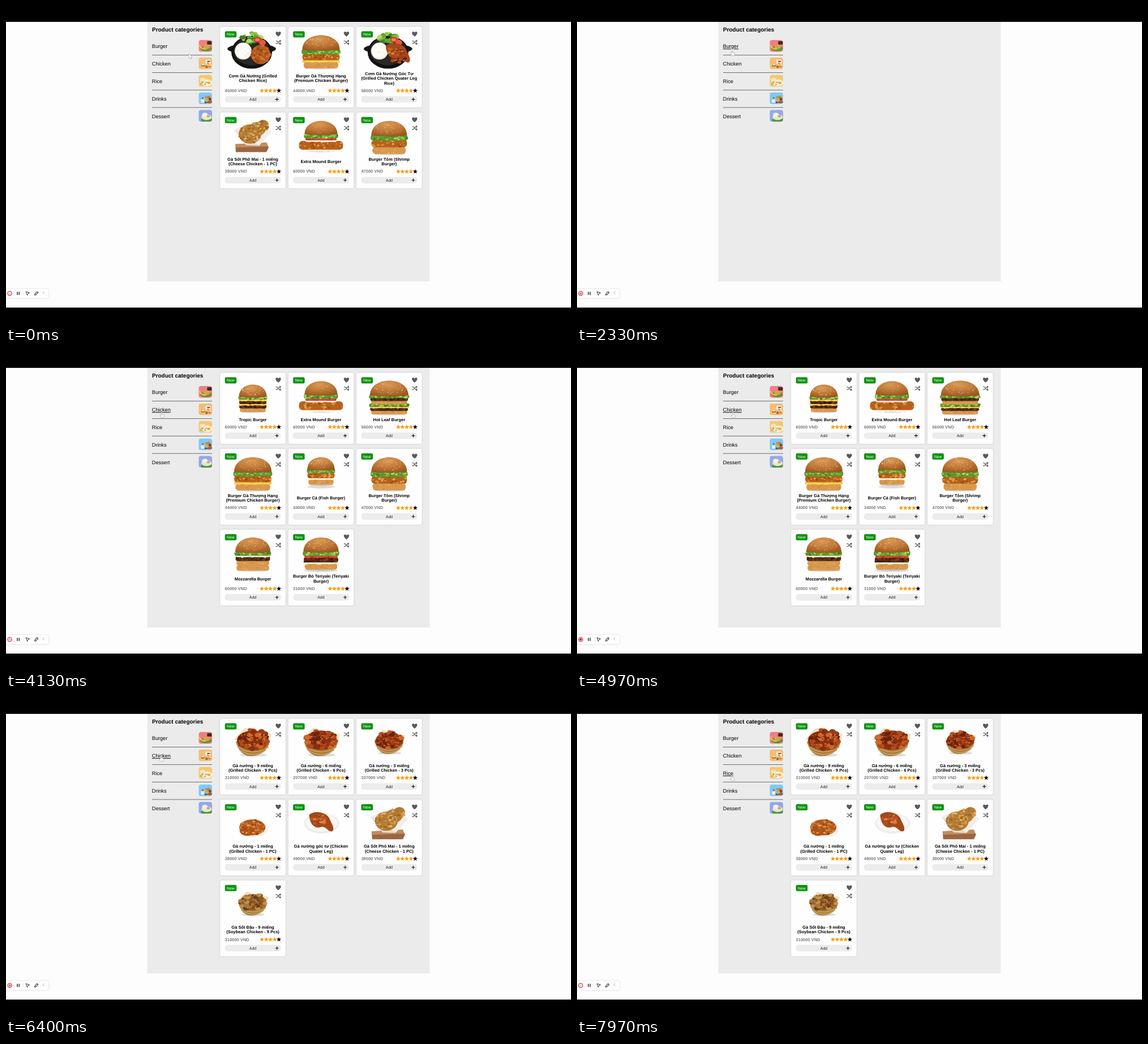
An HTML page for the animation above (8 s loop, 998 by 561 pixels).

```html
<!DOCTYPE html>
<html lang="en">
<head>
<meta charset="utf-8">
<title>Product categories</title>
<style>
  html, body { margin: 0; width: 100%; height: 100%; overflow: hidden; background: #fdfdfd; }
  svg { display: block; font-family: "Liberation Sans", Arial, sans-serif; text-rendering: geometricPrecision; }
  .name, .price { font-size: 7.49px; font-weight: bold; }
  .name, .add { text-anchor: middle; }
  .price { fill: #7b7b7b; }
  .add { font-size: 6.93px; fill: #222; }
  .new { font-size: 6.7px; fill: #fff; }
  .card { filter: drop-shadow(0 .8px 1px #0003); }
</style>
</head>
<body>
<svg id="stage" width="998" height="561" viewBox="0 0 998 561"></svg>
<script>
let seed = 11;
const rnd = () => (seed = seed * 16807 % 2147483647) / 2147483647;
const pick = list => list[Math.floor(rnd() * list.length)];

// Drawing helpers
const oval = (x, y, rx, ry, fill, more = '') =>
  `<ellipse cx="${x.toFixed(1)}" cy="${y.toFixed(1)}" rx="${rx.toFixed(1)}" ry="${ry.toFixed(1)}" fill="${fill}" ${more}/>`;
const rect = (x, y, w, h, r, fill, more = '') =>
  `<rect x="${x}" y="${y}" width="${w}" height="${h}" rx="${r}" fill="${fill}" ${more}/>`;
const path = (d, fill, more = '') => `<path d="${d}" fill="${fill}" ${more}/>`;
const line = (d, color, width) => path(d, 'none', `stroke="${color}" stroke-width="${width}" stroke-linecap="round" stroke-linejoin="round"`);
const text = (x, y, cls, s) => `<text x="${x}" y="${y}" class="${cls}">${s}</text>`;
const at = (x, y, body, more = '') => `<g transform="translate(${x} ${y})" ${more}>${body}</g>`;

function speckle(n, x, y, rx, ry, size, colors, box = false) {
  let out = '';
  for (let i = 0; i < n; i++) {
    const u = rnd() * 2 - 1, v = (rnd() * 2 - 1) * (box ? 1 : Math.sqrt(1 - u * u));
    const r = size * (.6 + rnd() * .7);
    out += oval(x + u * rx, y + v * ry, r, r * .7, pick(colors));
  }
  return out;
}

// Food
const GREEN = ['#64a532', '#8cc444', '#437f22', '#b4d868'];
const CRUST = ['#b8611c', '#d98a35', '#9a4a15', '#e3a552'];
const GLAZE = ['#8a2f10', '#b34a18', '#6c210c', '#c9682a', '#9d3b14'];
const GOLD = ['#b57c35', '#cf9a4c', '#9c6527', '#e0b470'];

// Burger layers: relative height, relative width, base fill, speckle colours
const LAYERS = {
  leaf: [8, 1.04, '#5b982e', GREEN],
  crispy: [11, 1, '#b8611c', CRUST],
  slab: [16, 1.34, '#b8611c', CRUST],
  patty: [9, .98, '#4d2817', ['#5f3420', '#3b1c10', '#744328']],
  cheese: [4, 1, '#f6c02c', ['#fbd45a']],
  tomato: [4, .94, '#c82a1e', ['#de4a35']],
  mayo: [3, .94, '#f6ecd0', ['#fff8e6']],
  bun: [11, .93, '#d8994e', ['#e0a860', '#cf8d42']],
};

function burger(w, top, height, layers, seeds = 60) {
  const stack = layers.split(' ').reverse(), high = height * .44, half = w / 2;
  const k = (height - high) / stack.reduce((sum, kind) => sum + LAYERS[kind][0], 0);
  let y = top + height, out = oval(0, y, w * .45, 2.5, '#0002');
  for (const kind of stack) {
    const [size, wide, fill, colors] = LAYERS[kind], h = size * k, side = half * wide;
    y -= h;
    out += rect(-side, y - 1, side * 2, h + 1.5, Math.min(6, h / 2), fill);
    out += speckle(kind === 'bun' ? 8 : 34, 0, y + h / 2, side - 1.5, h * .42, 2.1, colors, true);
  }
  const c = top - high / 3;
  out += path(`M${-half} ${y}C${-half} ${c} ${half} ${c} ${half} ${y}Q0 ${y + 4} ${-half} ${y}Z`, 'url(#crown)');
  return out + speckle(seeds, 0, top + high * .5, w * .38, high * .42, .65, ['#f0cf98', '#e6bb7a', '#f7dfb3']);
}

const thigh = (x, y, rx, ry, colors = CRUST) =>
  oval(x, y, rx, ry, colors[0]) + speckle(60, x, y, rx * .95, ry * .95, 2.4, colors);

const pan = meat => oval(-2, 39, 43, 9, '#191817') + oval(-2, 45, 36, 29, '#111') + oval(-2, 43, 32, 25, '#2b2725') +
  speckle(36, -2, 20, 17, 9, 4, GREEN) + oval(9, 23, 7, 5, '#d63a25') + oval(17, 28, 6, 5, '#e35a3c') + oval(8, 23, 4, 2.5, '#f0876a') +
  oval(-17, 43, 15, 15, '#e9e8e4') + oval(-17, 42, 14, 13.5, '#fafaf7') + speckle(18, -17, 43, 12, 12, 1, ['#e4e4e0', '#fff']) + meat;

const drumLeg = (x, y) => at(x, y,
  path('M-20 -13C-10 -23 14 -17 17 -4C20 3 25 9 22 15C15 20 11 7 2 8C-9 13 -19 4 -20 -13Z', '#a4481a') +
  speckle(36, -3, -4, 14, 9, 2.4, ['#c9662a', '#8a3511', '#b95220', '#d98243']));

const basket = (k, colors) => `<g transform="translate(0 41) scale(${k})">` +
  path('M-33 -4L-14 -25 5 -20 33 -14 27 12Z', '#eee0c0') + oval(1, 23, 24, 3, '#0002') +
  path('M-30 -1Q-24 24 -4 25Q24 24 30 -1Z', '#a87a3c') + line('M-26 9Q0 26 27 9M-22 15Q0 29 22 15', '#d1a863', 1.5) +
  oval(0, -3, 28, 17, colors[0]) + speckle(46, 0, -4, 27, 18, 5, colors) +
  speckle(40, 0, -5, 24, 16, 1.4, ['#dc8a48', '#5a1c0a', '#c87434']) + '</g>';

const cheeseChicken = () => path('M-31 56L24 53 28 62 24 70-30 70Z', '#9d6640') + path('M-31 56L24 53 27 60-30 62Z', '#c28c60') +
  path('M-33 30L-18 24 20 24 33 34 11 59Z', '#f2ede6') + path('M-33 30L-12 58 11 59Z', '#e2d9d0') +
  oval(-5, 38, 20, 17, GOLD[0]) + oval(8, 29, 15, 12, GOLD[0]) + oval(18, 22, 10, 9, GOLD[0]) +
  speckle(60, -5, 38, 19, 16, 2.2, GOLD) + speckle(40, 13, 26, 14, 11, 2.2, GOLD);

const FOOD = {
  riceThigh: () => pan(thigh(14, 49, 17, 17, ['#b45a20', '#d07a32', '#994315', '#c96c28'])),
  riceLeg: () => pan(drumLeg(14, 47) + speckle(14, 15, 58, 14, 5, 3, GLAZE)),
  premium: () => burger(66, 15, 58, 'leaf crispy cheese bun'),
  jumbo: () => burger(58, 15, 53, 'leaf tomato mayo slab mayo', 12),
  shrimp: () => burger(63, 15, 58, 'leaf crispy bun'),
  pineapple: () => burger(49, 21, 48, 'leaf cheese patty cheese patty bun'),
  tower: () => burger(68, 14, 59, 'leaf patty bun leaf cheese patty bun'),
  fish: () => oval(0, 67, 24, 3, '#0002') + burger(48, 15, 48, 'leaf crispy mayo bun'),
  mozzarella: () => burger(62, 14, 58, 'leaf mayo patty bun bun'),
  teriyaki: () => oval(0, 72, 30, 3, '#0002') + burger(62, 14, 56, 'leaf tomato patty mayo bun'),
  bigBasket: () => basket(1, GLAZE),
  smallBasket: () => basket(.85, GLAZE),
  piece: () => oval(0, 54, 26, 12, '#f3f0ea') + thigh(-1, 49, 23, 14, ['#b55a1e', '#cb742f', '#97430f', '#d88b48']) + oval(-10, 55, 13, 9, '#ad5319') + speckle(20, -6, 52, 16, 9, 2, CRUST),
  leg: () => oval(1, 42, 31, 18, '#efedea') + oval(1, 41, 28, 15, '#f9f8f6') + drumLeg(-1, 40),
  cheeseChicken,
  soy: () => basket(.84, ['#8b5a24', '#a9763a', '#6b4118', '#c09352']),
};

// Card parts
const star = Array.from({ length: 10 }, (_, i) => {
  const r = i % 2 ? 1.9 : 4.3, a = i * Math.PI / 5;
  return `${(Math.sin(a) * r).toFixed(2)} ${(-Math.cos(a) * r).toFixed(2)}`;
}).join('L');
const heart = path('M0 4.3C-8 -1.2 -4.2 -7 0 -2.9C4.2 -7 8 -1.2 0 4.3Z', '#58595b');
const shuffle = line('M-4.2 -2.4H-2.2L1.8 2.4H4M-4.2 2.4H-2.2L1.8 -2.4H4M2.8 -3.9L4.4 -2.4 2.8 -.9M2.8 .9L4.4 2.4 2.8 3.9', '#555', 1.1);

function card(x, top, rowLines, [name, price, food]) {
  const h = 117 + 8.5 * rowLines, lines = name.split('|'), mid = 57.8;
  const first = 78.2 + 4.25 * rowLines - 4.25 * (lines.length - 1) + 2.7;
  let out = rect(0, 0, 115.7, h, 3, '#fefefe', 'class="card"') + at(mid, 0, FOOD[food]());
  out += rect(8.5, 8, 20.5, 11, 2.5, '#0a930c') + text(11.9, 15.9, 'new', 'New');
  out += at(102.8, 13, heart) + at(102.8, 27.5, shuffle);
  lines.forEach((s, i) => out += text(mid, first + i * 8.5, 'name', s));
  out += text(8.4, h - 27.2, 'price', `${price} VND`);
  for (let i = 0; i < 5; i++) out += at(73.8 + i * 7.5, h - 29.7, path(`M${star}Z`, i < 4 ? '#f6a013' : '#050505'));
  out += rect(8.4, h - 20.2, 99, 11.4, 5, '#ececec') + text(mid, h - 12, 'add', 'Add') +
    line(`M97.8 ${h - 14.5}h5.2m-2.6 -2.6v5.2`, '#111', 1.1);
  return at(x, top, out);
}

function view(id, items) {
  let top = 36.6, out = '';
  for (let i = 0; i < items.length; i += 3) {
    const row = items.slice(i, i + 3), n = Math.max(...row.map(item => item[0].split('|').length));
    row.forEach((item, col) => out += card(378.2 + 120.4 * col, top, n, item));
    top += 117 + 8.5 * n + 8.6;
  }
  return `<g id="${id}">${out}</g>`;
}

const jumbo = ['Extra Mound Burger', 60000, 'jumbo'];
const premium = ['Burger Gà Thượng Hạng|(Premium Chicken Burger)', 44000, 'premium'];
const shrimp = ['Burger Tôm (Shrimp|Burger)', 47000, 'shrimp'];
const cheesy = ['Gà Sốt Phô Mai - 1 miếng|(Cheese Chicken - 1 PC)', 38000, 'cheeseChicken'];
const grilled = (n, unit, price, food) => [`Gà nướng - ${n} miếng|(Grilled Chicken - ${n} ${unit})`, price, food];

const views = view('home', [
  ['Cơm Gà Nướng (Grilled|Chicken Rice)', 45000, 'riceThigh'], premium,
  ['Cơm Gà Nướng Góc Tư|(Grilled Chicken Quater Leg|Rice)', 58000, 'riceLeg'], cheesy, jumbo, shrimp,
]) + view('burgers', [
  ['Tropic Burger', 60000, 'pineapple'], jumbo, ['Hot Leaf Burger', 56000, 'tower'],
  premium, ['Burger Cá (Fish Burger)', 34000, 'fish'], shrimp,
  ['Mozzarella Burger', 60000, 'mozzarella'], ['Burger Bò Teriyaki (Teriyaki|Burger)', 31000, 'teriyaki'],
]) + view('chicken', [
  grilled(9, 'Pcs', 310000, 'bigBasket'), grilled(6, 'Pcs', 207000, 'bigBasket'), grilled(3, 'Pcs', 107000, 'smallBasket'),
  grilled(1, 'PC', 38000, 'piece'), ['Gà nướng góc tư (Chicken|Quater Leg)', 49000, 'leg'], cheesy,
  ['Gà Sốt Đậu - 9 miếng|(Soybean Chicken - 9 Pcs)', 310000, 'soy'],
]);

// Sidebar: label, thumbnail background, thumbnail drawing
const categories = [
  ['Burger', '#f07f82', oval(13, 15, 10, 5, '#5d9636') + oval(14, 12, 6, 4, '#d9a04e') + rect(15, 2, 8, 6, 1, '#3a2d26') + line('M1 9Q4 16 12 16', '#f0c24a', 2)],
  ['Chicken', '#f5bd72', rect(12, 4, 9, 7, 1, '#f4eee4') + rect(15, 6, 5, 2, 0, '#6b4a38') + speckle(14, 14, 14, 8, 4, 2, ['#a9622c', '#c98645', '#efe3d0'])],
  ['Rice', '#f6c672', oval(15, 14, 9, 6, '#f8f1df') + oval(18, 14, 3, 2, '#f0aa28') + oval(7, 9, 5, 4, '#f4e5b8') + speckle(8, 9, 14, 6, 4, 1.5, ['#8fa64a', '#e7d9b2', '#d19340'])],
  ['Drinks', '#80c8f6', speckle(22, 14, 12, 8, 6, 2.4, ['#8f551f', '#c98231', '#d9a23f', '#6d4a22']) + rect(4, 12, 6, 6, 1, '#e9eef2') + oval(20, 17, 4, 2, '#c6482a')],
  ['Dessert', '#93a8ea', oval(14, 18, 10, 4, '#4d9a45') + oval(14, 13, 9, 5, '#e9e4c9') + oval(11, 9, 5, 4, '#f4f0e2') + oval(17, 11, 3, 2, '#cda86a')],
];
const sidebar = `<text x="258" y="45.4" font-size="9.98" font-weight="bold">Product categories</text>` +
  categories.map(([label, fill, art], i) => {
    const y = 74.4 + 30.8 * i;
    return `<text x="257.8" y="${y}" font-size="9.15" class="link">${label}</text>` +
      at(340.3, y - 14.4, rect(0, 0, 23.7, 20.8, 4, fill) + art, 'clip-path="url(#thumb)"') +
      (i < 4 ? rect(258, y + 11.8, 106, .9, 0, '#5f5f5f') : '');
  }).join('');

const toolbar = rect(-5, 499, 80, 16.5, 3, '#fefefe', 'class="card"') +
  oval(6.5, 507, 3.7, 3.7, 'none', 'stroke="#c8202f" stroke-width="1.1"') + oval(6.5, 507, 2.2, 2.2, '#c8202f', 'id="record"') +
  line('M20 504.7v4.6M23.2 504.7v4.6', '#222', 1.4) + line('M30.5 503v8', '#e4e4e4', .6) +
  line('M35.5 504L41.6 506.2 38.8 507.3 37.7 510Z', '#333', 1) +
  line('M50.6 510L51.2 507.6 54.9 503.9 56.7 505.7 53 509.4Z', '#333', 1.1) + line('M67.3 503.9L65.2 506 67.3 508.1', '#999', .8);

const outline = 'stroke="#999" stroke-width=".6" stroke-linejoin="round"';
const cursor = `<g id="cursor">` +
  path('M0 0V8.6L2 6.8 3.4 9.8 4.8 9.2 3.4 6.3H6Z', '#fff', `id="arrow" ${outline}`) +
  path('M-.8 .8Q0 -.6 .9 .8V4L4 4.8Q4.8 5 4.6 6.2L4 9.4H-1L-3 6.2Q-2.6 5.2 -.8 6.2Z', '#fff', `id="hand" ${outline}`) + '</g>';

document.getElementById('stage').innerHTML = `<defs>
  <radialGradient id="crown" cx=".45" cy=".25" r=".8"><stop offset="0" stop-color="#d99a55"/><stop offset=".55" stop-color="#bd7434"/><stop offset="1" stop-color="#96541f"/></radialGradient>
  <clipPath id="thumb"><rect width="23.7" height="20.8" rx="4"/></clipPath></defs>` +
  rect(0, 0, 998, 561, 0, '#fdfdfd') + rect(249.5, 28, 499, 458, 0, '#ebebeb') +
  sidebar + views + toolbar + cursor +
  rect(0, 0, 998, 28, 0, '#000') + rect(0, 532, 998, 29, 0, '#000');

// Motion: time, cursor tip x, y
const track = [
  [0, 323, 84], [1670, 264, 92], [2000, 274, 78], [3550, 274, 78],
  [3950, 275, 106], [5300, 275, 106], [5800, 273.5, 102], [6950, 273.5, 102], [7400, 273.5, 136], [8000, 273.5, 136],
];
// Each list of products is cleared on a click and filled again once loaded
const spans = { home: [0, 2300], burgers: [3500, 5350], chicken: [6150, 8000] };
const get = id => document.getElementById(id);
const links = [...document.querySelectorAll('.link')];
const show = (id, on) => get(id).style.display = on ? '' : 'none';

function draw(t) {
  const i = track.findIndex(key => key[0] > t), [t0, x0, y0] = track[i - 1], [t1, x1, y1] = track[i];
  const p = (t - t0) / (t1 - t0), e = p * p * (3 - 2 * p);
  const x = x0 + (x1 - x0) * e, y = y0 + (y1 - y0) * e;
  const hovering = t > 1900, hovered = hovering ? Math.floor((y - 56) / 30.8) : -1;
  get('cursor').setAttribute('transform', `translate(${x} ${y})`);
  show('arrow', !hovering);
  show('hand', hovering);
  links.forEach((link, n) => link.style.textDecoration = n === hovered ? 'underline' : 'none');
  for (const id in spans) show(id, t >= spans[id][0] && t < spans[id][1]);
  get('record').style.opacity = .6 + .4 * Math.cos((t / 2000 - .43) * 2 * Math.PI);
}

(function loop() {
  draw(performance.now() % 8000);
  requestAnimationFrame(loop);
})();
</script>
</body>
</html>
```
